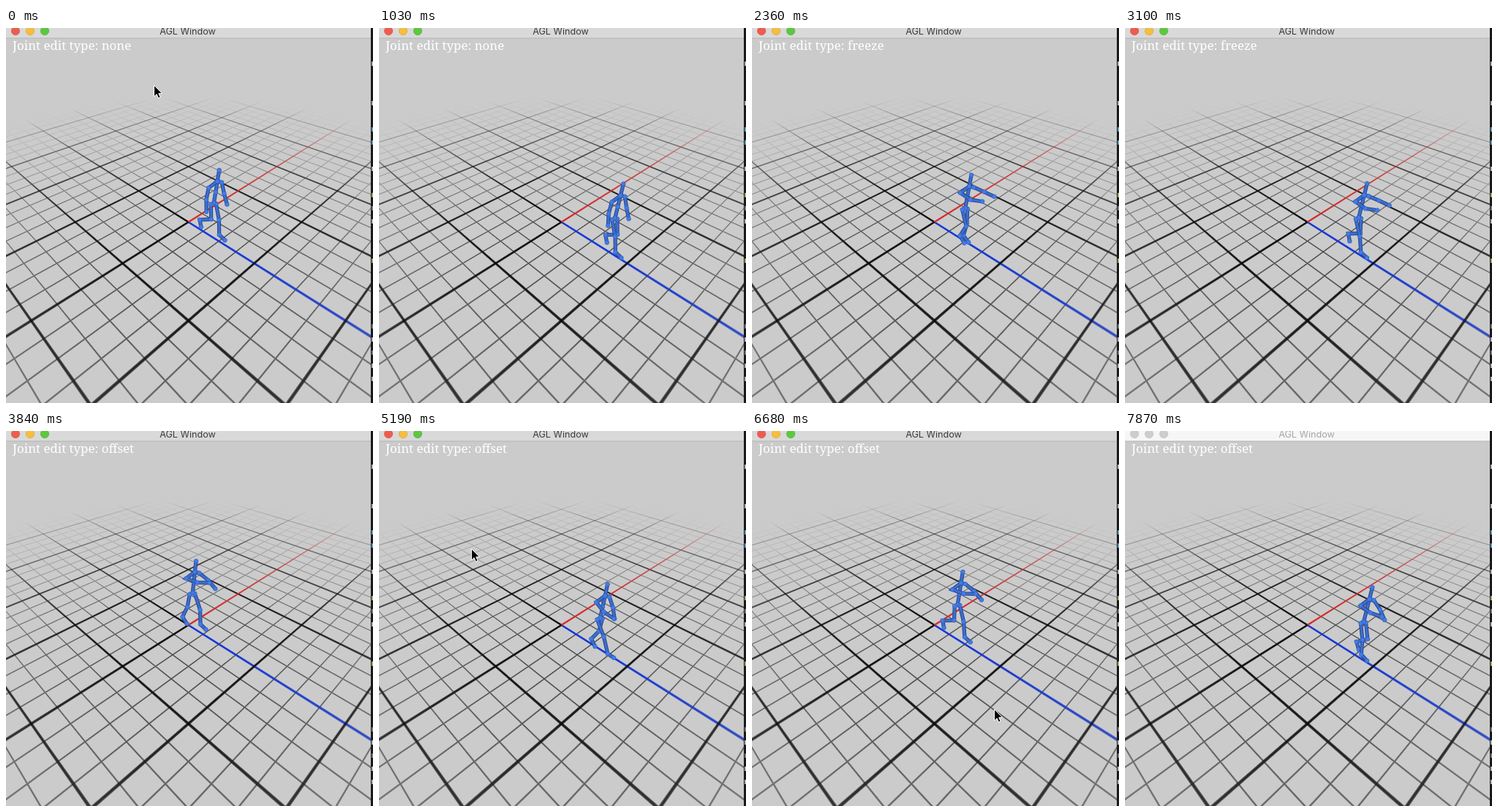
Animation, 502 px wide and 514 px high, one loop 7.97 s. Source, as an HTML page with a canvas:

```html
<!DOCTYPE html>
<html lang="en">
<head>
<meta charset="utf-8">
<title>AGL Window</title>
<style>
  html, body { margin: 0; width: 502px; height: 514px; overflow: hidden; background: #cbcbcb; }
  canvas, svg { position: absolute; left: 0; top: 0; }
  .title { font: 12.6px Inter, Arial, sans-serif; text-anchor: middle; fill: #3c3c3c; }
  .hud { font: 16.9px "Noto Serif", serif; fill: #fff; }
  .bar { fill: #d9d9d9; }
  .idle .bar { fill: #f6f6f6; }
  .idle .title { fill: #a6a6a6; }
  .idle .light { fill: #cdcdcd; stroke: #bdbdbd; }
</style>
</head>
<body>
<canvas id="floor" width="502" height="514"></canvas>
<canvas id="stage" width="502" height="514"></canvas>
<svg id="chrome" width="502" height="514">
  <rect class="bar" width="499" height="14"/>
  <rect y="13.5" width="499" height="1" fill="#b4b4b4"/>
  <circle class="light" cx="13" cy="4" r="5.7" fill="#ee5c50" stroke="#d9493f" stroke-width=".6"/>
  <circle class="light" cx="33" cy="4" r="5.7" fill="#f6bd3e" stroke="#dca032" stroke-width=".6"/>
  <circle class="light" cx="53" cy="4" r="5.7" fill="#5cc83f" stroke="#4bac33" stroke-width=".6"/>
  <text class="title" x="248.5" y="9">AGL Window</text>
  <text class="hud" id="hud" x="9" y="29.5"></text>
  <rect x="499" width="3" height="514" fill="#1a1a1c"/>
  <g id="marks"></g>
  <path id="cursor" d="M0 0V15.5L3.6 12.2L6 17.6L8.6 16.5L6.3 11.2H11Z" fill="#000" stroke="#fff"/>
</svg>
<script>
const $ = id => document.getElementById(id);
const clamp = v => Math.max(0, Math.min(1, v));

// Ground plane: one unit is a heavy grid cell, seen along its diagonal.
function drawFloor() {
  const ctx = $('floor').getContext('2d'), img = ctx.createImageData(502, 514);
  const cover = (v, step, grad, width) => {
    const d = Math.abs(v - Math.round(v / step) * step) / grad;
    return clamp((width / 2 + .6 - d) / 1.2) * Math.min(1, width);
  };
  for (let y = 0, i = 0; y < 514; y++) {
    const q = 11.5 + .14 * y, t = (y - 265.5) / q, w = 1 - .14 * t;
    const ty = 48.67 / (q * q), ux = w / 77.4;
    for (let x = 0; x < 502; x++, i += 4) {
      const u = (x - 249) * ux, uy = -.14 * ty * (x - 249) / 77.4;
      const a = (t - u) / 2, b = (t + u) / 2;
      const ga = Math.hypot(ux, ty - uy) / 2, gb = Math.hypot(ux, ty + uy) / 2;
      const fade = 1 - Math.min(1, Math.hypot(a, b) / 4.9) ** 1.2;
      const thin = 1.1 / w ** 1.5, thick = 2.3 / w ** 1.5;
      const black = [8, 8, 8];
      let rgb = [203, 203, 203];
      const blend = (color, k) => { rgb = rgb.map((c, n) => c + (color[n] - c) * k * fade); };
      blend(black, .8 * Math.max(cover(a, .25, ga, thin), cover(b, .25, gb, thin)));
      blend(Math.round(a) === 0 && b > 0 ? [15, 50, 220] : black, cover(a, 1, ga, thick));
      blend(Math.round(b) === 0 && a < 0 ? [220, 40, 40] : black, cover(b, 1, gb, thick));
      img.data.set([...rgb, 255], i);
    }
  }
  ctx.putImageData(img, 0, 0);
}

const ctx = $('stage').getContext('2d');
ctx.lineCap = 'round';

function chain(points) {
  const line = (width, color) => {
    ctx.lineWidth = width;
    ctx.strokeStyle = color;
    ctx.beginPath();
    points.forEach(p => ctx.lineTo(...p));
    ctx.stroke();
  };
  line(5.2, '#28468f');
  line(3.2, '#3c6ecd');
  for (const [x, y] of points) {
    ctx.beginPath();
    ctx.arc(x, y, 2.9, 0, 7);
    ctx.fillStyle = '#437ce6';
    ctx.fill();
    ctx.lineWidth = .5;
    ctx.strokeStyle = '#2f58b4';
    ctx.stroke();
  }
}

const STRIDE = 14; // steps per walk cycle
const wave = (p, peak, period = STRIDE) => Math.cos(2 * Math.PI * (p - peak) / period);
const rad = deg => deg * Math.PI / 180;
const add = ([x, y], dx, dy) => [x + dx, y + dy];

// Screen angles: upper arm and forearm, near then far; swing is their amplitude.
const poses = {
  none: { angles: [103, 91, 80, 77], swing: 4 },
  freeze: { angles: [35, 8, 23, 25], swing: 0 },
  offset: { angles: [32, 14, 52, 62], swing: 20 }
};

function drawFigure(p, mode) {
  const pelvis = [245.5 + 5.5 * p + 4 * wave(p, 6.9, 7), 219 + 3.15 * p + 3.5 * wave(p, 9.5)];
  const size = 1 + (pelvis[0] - 285) * .00125;
  const head = [3.5 + .6 * p, -43 - .3 * p];
  const spine = k => add(pelvis, head[0] * k, head[1] * k);

  // A bone in the walking plane, its angle taken from straight down.
  const bone = (from, length, deg) => {
    const forward = Math.sin(rad(deg)) * length * size, down = Math.cos(rad(deg)) * length * size;
    return add(from, .707 * forward, .445 * forward + .777 * down);
  };
  const leg = (dx, dy, q) => {
    const thigh = 7 + 22 * wave(q, 10.5);
    const shin = thigh - 12 - 48 * Math.max(0, wave(q, 6.6)) ** 2;
    const hip = add(pelvis, dx, dy), knee = bone(hip, 26, thigh), ankle = bone(knee, 26, shin);
    chain([pelvis, hip, knee, ankle, bone(ankle, 11.5, shin + 72)]);
  };
  const { angles, swing } = poses[mode];
  const arm = (dx, dy, length, first) => {
    const points = [spine(.66), add(spine(.66), dx, dy)];
    for (const deg of angles.slice(first, first + 2)) {
      const turn = rad(deg - swing * wave(p, 4));
      points.push(add(points.at(-1), length * Math.cos(turn), length * Math.sin(turn)));
    }
    chain(points);
  };

  ctx.clearRect(0, 0, 502, 514);
  arm(6, 1.5, 15.5, 2);
  leg(3, 1, p + STRIDE / 2);
  chain([0, .33, .66, 1].map(spine));
  leg(-4, 2, p);
  arm(-12, 9, 16.5, 0);
}

const starts = [39, 24, 8, -6.4]; // steps at which the walk begins again
const cursors = { 0: [202.5, 78.5], 35: [126.5, 161.5], 45: [331.5, 381.5], 46: [432.5, 453.5] };

function render(t) {
  const n = Math.min(53, Math.floor((t + 20) / 148.4));
  const mode = n < 8 ? 'none' : n < 25 ? 'freeze' : 'offset';
  drawFigure(n - starts.find(s => s <= n), mode);
  $('hud').textContent = 'Joint edit type: ' + mode;
  $('chrome').classList.toggle('idle', n === 53);
  const c = cursors[n];
  $('cursor').style.display = c ? '' : 'none';
  if (c) $('cursor').setAttribute('transform', `translate(${c})`);
}

// Slivers of text lines in the window behind, along the right edge
const tints = { w: '#b5b5b5', c: '#5a9fb8', y: '#a8a470', g: '#777' };
$('marks').innerHTML = [...'w  w cc w ygw  y    gwgww'].map((key, i) => tints[key] ?
  `<rect x="500" y="${46 + 18 * i}" width="2" height="6" fill="${tints[key]}"/>` : '').join('');

drawFloor();
const begin = performance.now();
function tick() {
  render((performance.now() - begin) % 7970);
  requestAnimationFrame(tick);
}
tick();
</script>
</body>
</html>
```
